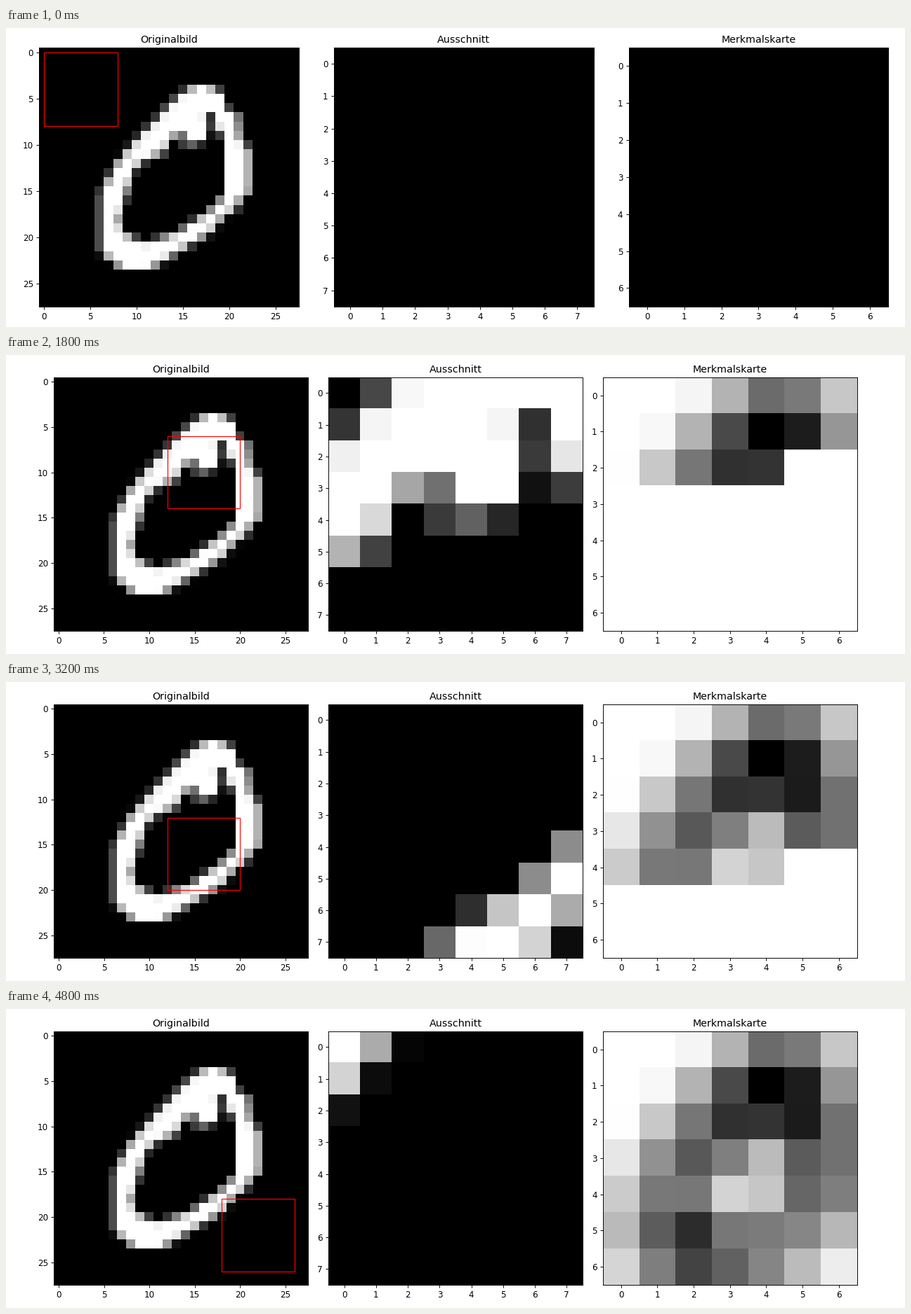
Recreate the animation shown at these times as a matplotlib script. Size 1280 px wide and 427 px high, loop 4.9 s.

```python
import numpy as np
import matplotlib.pyplot as plt
from matplotlib.animation import FuncAnimation
from matplotlib.patches import Rectangle
from matplotlib.path import Path

plt.rcParams["font.family"] = "DejaVu Sans"

SIZE, WIN, STEP, GRID = 28, 8, 3, 7
FINE = 10  # samples per pixel side when rasterising the digit

# Corner points (x, y) of the hand-drawn zero, in digit pixels.
OUTER = [(6.67, 15.7), (8.3, 12.5), (11, 9.4), (15.2, 5), (17, 4), (18, 4),
         (20, 5), (20, 6), (20.5, 7), (21.4, 7), (21.7, 10), (22.7, 11),
         (22.75, 15.9), (21.8, 16), (21.5, 17.2), (19.8, 18.3), (18.5, 20),
         (11.8, 24), (9, 24), (7.8, 23), (6.67, 22)]
HOLE = [(14, 10), (13.6, 11.3), (11.7, 12), (10.3, 13), (9.5, 15.5),
        (8.6, 18.5), (9, 20), (11.3, 21.15), (12.5, 20.8), (15, 20),
        (16.2, 19), (17.9, 18), (20, 16), (20, 9.6), (19.2, 9), (18.8, 7),
        (17.8, 7), (18.3, 8), (18, 10), (16.5, 10.45), (15.4, 10.35),
        (15.7, 9.1), (14.9, 9), (14.4, 10)]


def make_digit():
    """Grey level of a pixel = share of its area covered by ink."""
    t = (np.arange(SIZE * FINE) + 0.5) / FINE
    points = np.stack(np.meshgrid(t, t), axis=-1).reshape(-1, 2)
    ink = (Path(OUTER).contains_points(points)
           & ~Path(HOLE).contains_points(points))
    return ink.reshape(SIZE, FINE, SIZE, FINE).mean(axis=(1, 3))


def window(k):
    row, col = divmod(k, GRID)
    return STEP * row, STEP * col


def crop(k):
    y, x = window(k)
    return digit[y:y + WIN, x:x + WIN]


# Repeated tight layout of three square axes, on a 1500 x 500 canvas.
W, H, PAD = 1500, 500, 15
LABEL_1, LABEL_N, EDGE, TITLE, TICKS = 28, 18.3, 0.5, 22.3, 23.7


def squares(box):
    left, right, top, bottom, gap = box
    w = (W - left - right - 2 * gap) / 3
    h = H - top - bottom
    side = min(w, h)
    return w, side, (w - side) / 2, (h - side) / 2


def tighten(box):
    _, _, dx, dy = squares(box)
    return (PAD + max(LABEL_1 - dx, 0), PAD + max(EDGE - dx, 0),
            PAD + max(TITLE - dy, 0), PAD + max(TICKS - dy, 0),
            PAD + LABEL_N + EDGE - 2 * dx)


def positions(k):
    box = (187.5, 150, 60, 55, 68.4)
    for _ in range(k + 2):
        box = tighten(box)
    w, side, dx, dy = squares(box)
    left, _, _, bottom, gap = box
    return [((left + dx + i * (w + gap)) / W, (bottom + dy) / H,
             side / W, side / H) for i in range(3)]


digit = make_digit()
features = np.array([1 - crop(k).mean() for k in range(GRID ** 2)])

# 1280 x 427 pixels
fig = plt.figure(figsize=(15, 1281 / 256), dpi=256 / 3, facecolor="white")


def panel(pos, title, data, tick_step):
    ax = fig.add_axes(pos)
    im = ax.imshow(data, cmap="gray", interpolation="nearest", aspect="auto")
    ax.set_title(title)
    ticks = np.arange(0, len(data), tick_step)
    ax.set_xticks(ticks)
    ax.set_yticks(ticks)
    return ax, im


start = positions(0)
ax_img, _ = panel(start[0], "Originalbild", digit, 5)
ax_crop, im_crop = panel(start[1], "Ausschnitt", crop(0), 1)
ax_map, im_map = panel(start[2], "Merkmalskarte", np.ones((GRID, GRID)), 1)
axes = (ax_img, ax_crop, ax_map)
frame = ax_img.add_patch(Rectangle((0, 0), WIN, WIN, fill=False,
                                   edgecolor="red", linewidth=1))


def show(im, data):
    im.set_data(data)
    im.set_clim(data.min(), data.max())


def draw(k):
    for ax, pos in zip(axes, positions(k)):
        ax.set_position(pos)
    y, x = window(k)
    frame.set_xy((x, y))
    show(im_crop, crop(k))
    done = np.arange(GRID ** 2) <= k
    show(im_map, np.where(done, features, 1.0).reshape(GRID, GRID))
    return frame, im_crop, im_map


anim = FuncAnimation(fig, draw, frames=GRID ** 2, init_func=lambda: draw(0),
                     interval=100, repeat=True, repeat_delay=0, blit=False)
plt.show()
```
